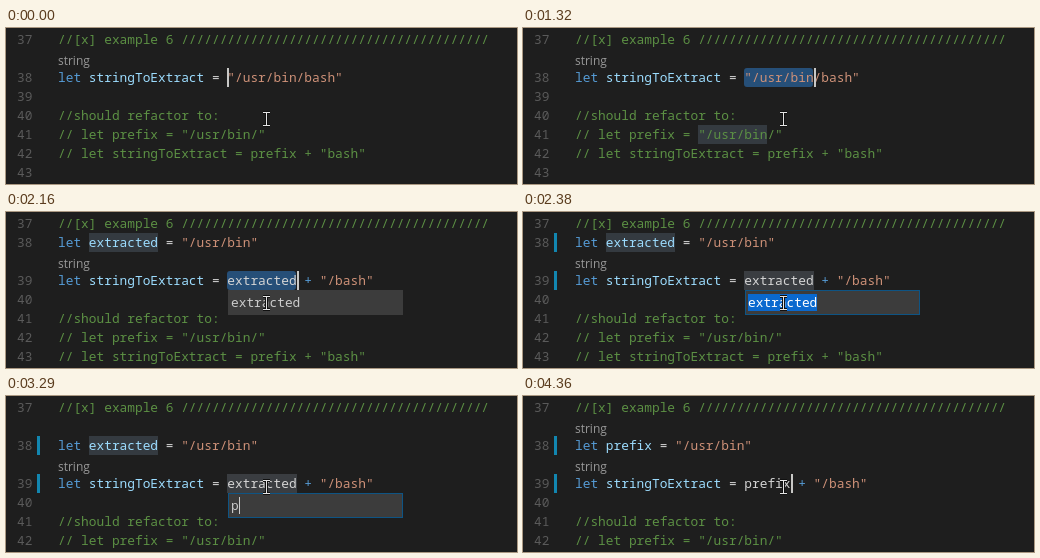
These frames come from a looping animation (511x156 px, 4660 ms). An HTML page with a canvas:

```html
<!DOCTYPE html>
<html lang="en">
<head>
<meta charset="utf-8">
<title>Extract and rename</title>
<style>
  html, body { margin: 0; width: 100%; height: 100%; overflow: hidden; background: #1e1e1e; }
  canvas { display: block; width: 511px; height: 156px; }
</style>
</head>
<body>
<canvas id="stage" width="511" height="156"></canvas>
<script>
const ctx = document.getElementById('stage').getContext('2d');
const LOOP = 4660;
const CHAR = 7.697, LINE = 19, TOP = 2, LEFT = 52;
const MONO = '12.83px "Noto Sans Mono", "DejaVu Sans Mono", monospace';
const LENS = '12px "Open Sans", "Noto Sans", sans-serif';
const C = {
  bg: '#1e1e1e', number: '#5a5a5a', lens: '#999999', comment: '#5c9044',
  keyword: '#569cd6', name: '#9cdcfe', string: '#ce9178', plain: '#d4d4d4',
  select: '#264f78', idle: '#3a3d41', match: '#343a40', caret: '#c8c8c6',
  changed: '#1286b0', input: '#3c3c3c', focus: '#0e5484', picked: '#0a69cf'
};
const TITLE = '//[x] example 6 ' + '/'.repeat(40);
const NOTES = ['', '//should refactor to:', '// let prefix = "/usr/bin/"',
  '// let stringToExtract = prefix + "bash"', ''];
const TYPING = [[3230, 'p'], [3370, 'pr'], [3510, 'pre'], [3670, 'pref'], [3820, 'prefi'], [3900, 'prefix']];

const col = n => LEFT + n * CHAR;
const rowY = r => TOP + r * LINE;

function box(x, y, w, h, color) {
  ctx.fillStyle = color;
  ctx.fillRect(Math.round(x), y, Math.round(x + w) - Math.round(x), h);
}

function mono(text, x, baseline, color) {
  ctx.font = MONO;
  ctx.fillStyle = color;
  [...text].forEach((ch, i) => { if (ch !== ' ') ctx.fillText(ch, x + i * CHAR, baseline); });
}

function code(text, row) {
  const base = rowY(row) + 14;
  if (text.startsWith('//')) return mono(text, LEFT, base, C.comment);
  let afterLet = false;
  for (const m of text.matchAll(/"[^"]*"|\w+|[^\s\w]/g)) {
    const s = m[0];
    let color = C.plain;
    if (s[0] === '"') color = C.string;
    else if (s === 'let' || s === '+') color = C.keyword;
    else if (afterLet) color = C.name;
    afterLet = s === 'let';
    mono(s, col(m.index), base, color);
  }
}

function lens(row, alpha = 1) {
  ctx.globalAlpha = alpha;
  ctx.font = LENS;
  ctx.fillStyle = C.lens;
  ctx.fillText('string', LEFT, rowY(row) + 16);
  ctx.globalAlpha = 1;
}

function line(number, text, row) {
  mono(String(number), 11, rowY(row) + 14, C.number);
  code(text, row);
}

function mark(row, start, length, color) {
  box(col(start), rowY(row), length * CHAR, LINE, color);
}

function selection(row, start, length) {
  ctx.fillStyle = C.select;
  ctx.beginPath();
  ctx.roundRect(Math.round(col(start)), rowY(row), Math.round(length * CHAR), LINE, 3);
  ctx.fill();
}

function caret(row, column) {
  box(col(column), rowY(row), 2, LINE, C.caret);
}

function notes(number, row) {
  NOTES.forEach((text, i) => line(number + i, text, row + i));
}

function selecting(t) {
  const count = t < 80 ? 0 : t < 460 ? 2 : t < 840 ? 5 : t < 1320 ? 6 : 9;
  if (count) {
    selection(2, 22, count);
    mark(5, 16, count, C.match);
  }
  lens(1);
  line(38, 'let stringToExtract = "/usr/bin/bash"', 2);
  notes(39, 3);
  if (t < 1850) caret(2, 22 + count);
}

function renameBox(t, row) {
  const x = 222, y = rowY(row), focused = t >= 2240;
  box(x, y, 175, 25, C.input);
  if (focused) {
    ctx.strokeStyle = C.focus;
    ctx.lineWidth = 1;
    ctx.strokeRect(x + .5, y + .5, 174, 24);
  }
  let typed = '';
  for (const [at, text] of TYPING) if (t >= at) typed = text;
  if (focused && !typed) box(225, y + 4, 9 * CHAR, 17, C.picked);
  mono(typed || 'extracted', 225, y + 17, focused && !typed ? '#ffffff' : '#cccccc');
  if (typed) box(225 + typed.length * CHAR, y + 4, 1, 17, '#cccccc');
}

function renaming(t) {
  const settled = t >= 2690, done = t >= 4360, open = t < 4280;
  const def = settled ? 2 : 1, use = def + 2;
  const name = done ? 'prefix' : 'extracted';
  if (!done) {
    mark(def, 4, 9, C.match);
    if (t < 2240) selection(use, 22, 9);
    else mark(use, 22, 9, C.idle);
  }
  if (t >= 2380) for (const row of [def, use]) box(31, rowY(row), 3, LINE, C.changed);
  if (t >= 3300) lens(1, t < 3590 ? .55 : 1);
  lens(def + 1);
  line(38, `let ${name} = "/usr/bin"`, def);
  line(39, `let stringToExtract = ${name} + "/bash"`, use);
  notes(40, use + 1);
  if (t < 2240 || !open) caret(use, 22 + name.length);
  if (open) renameBox(t, use + 1);
}

function pointer() {
  const beam = () => {
    ctx.beginPath();
    ctx.moveTo(257, 84.5); ctx.lineTo(264, 84.5);
    ctx.moveTo(260.5, 84.5); ctx.lineTo(260.5, 97.5);
    ctx.moveTo(257, 97.5); ctx.lineTo(264, 97.5);
    ctx.stroke();
  };
  ctx.strokeStyle = '#101010';
  ctx.lineWidth = 3;
  beam();
  ctx.strokeStyle = '#e4e4e4';
  ctx.lineWidth = 1;
  beam();
}

function draw(now) {
  const t = now % LOOP;
  box(0, 0, 511, 156, C.bg);
  line(37, TITLE, 0);
  if (t < 2160) selecting(t);
  else renaming(t);
  pointer();
}

const start = performance.now();
function frame() {
  draw(performance.now() - start);
  requestAnimationFrame(frame);
}
frame();
</script>
</body>
</html>
```
